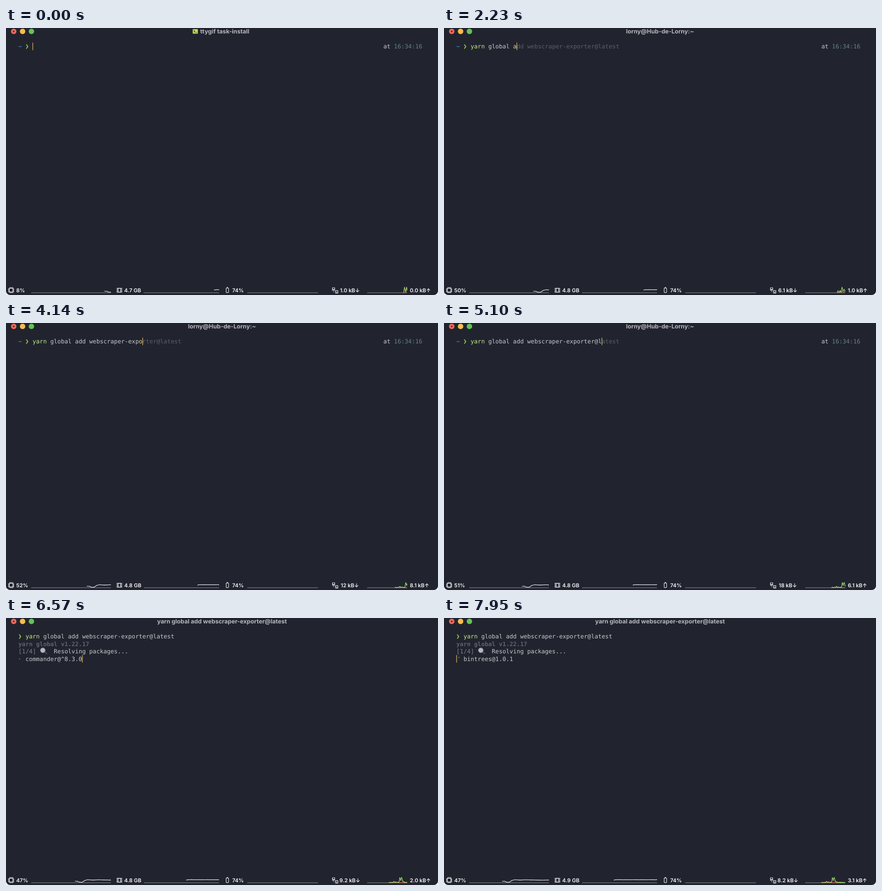
Write an HTML page that moves like this. It is 951 px wide and 589 px high and loops after 8000 ms.

```html
<!DOCTYPE html>
<html lang="en">
<head>
<meta charset="utf-8">
<title>Terminal</title>
<style>
  html, body { margin: 0; width: 100%; height: 100%; overflow: hidden; background: #fff; }
  svg { display: block; width: 951px; height: 589px; }
  text { white-space: pre; text-rendering: geometricPrecision; }
  .mono { font: 12.96px "DejaVu Sans Mono", monospace; fill: #c6c8ca; }
  .title { font: 700 13px Inter, sans-serif; fill: #b5b6ba; }
  .stat { font: 600 11.7px Inter, sans-serif; fill: #f4f4f5; }
  .blue { fill: #4aa5df; }
  .clock { fill: #648188; }
  .good { fill: #c3e88d; }
  .bad { fill: #f0616d; }
  .hint { fill: #5b5f68; }
  .dim { fill: #7b7f87; }
  .ver { fill: #5c626d; font-weight: 700; }
  .icon { fill: none; stroke: #ececee; stroke-width: 1.2; }
  .base { fill: none; stroke: #94969b; stroke-width: 1; }
  .plot { fill: none; stroke: #f4f4f5; stroke-width: 1.2; stroke-linejoin: round; }
  #rx { stroke: #a5e878; }
  #tx { stroke: #e0604f; }
</style>
</head>
<body>
<svg viewBox="0 0 951 589">
  <path fill="#21242e" d="M0 0H951V580a9 9 0 0 1-9 9H9a9 9 0 0 1-9-9Z"/>

  <circle cx="17" cy="7.5" r="6" fill="#ed6a5e"/>
  <circle cx="17" cy="7.5" r="1.9" fill="#8a1e14"/>
  <circle cx="36.5" cy="7.5" r="6" fill="#f5bd4f"/>
  <circle cx="56" cy="7.5" r="6" fill="#61c454"/>
  <g id="badge">
    <rect x="411" y="2.5" width="11.3" height="10" rx="1" fill="#ccd750"/>
    <path d="M413.3 5l2.4 2.2-2.4 2.2M416.8 9.8h3.2" fill="none" stroke="#21242e" stroke-width="1.1"/>
  </g>
  <text id="title" class="title" y="12"></text>

  <g id="prompt" class="mono">
    <text x="27.3" y="45" class="blue">~</text>
    <text x="830.7" y="45">at <tspan class="clock">16:34:16</tspan></text>
  </g>
  <path id="chevron" fill="#8fd14c" d="M1 36.3h2.1L6.4 41 3.1 45.8H1L4 41Z"/>
  <text id="line" class="mono" y="45"><tspan id="cmd"></tspan><tspan id="args"></tspan><tspan id="hint" class="hint"></tspan></text>

  <text id="version" class="mono ver" x="27.3" y="61.5">yarn global v1.22.17</text>
  <g id="resolving">
    <text class="mono dim" x="27.3" y="78">[1/4]</text>
    <path d="M85 75l4.6 3.6" stroke="#50545c" stroke-width="2.2" stroke-linecap="round"/>
    <circle cx="81" cy="71.2" r="5.3" fill="#b4bac0" stroke="#8a8f96" stroke-width="1"/>
    <text class="mono" x="105.3" y="78">Resolving packages...</text>
  </g>
  <text id="pkg" class="mono" x="42.9" y="94.5"></text>
  <circle id="dot" r=".9" fill="#b4b6ba"/>
  <rect id="cursor" width="1.3" height="16.6" fill="#e6b45c"/>

  <g class="icon">
    <rect x="7.2" y="574.2" width="8.2" height="8.2" stroke-width="1.5"/>
    <path d="M8 572.4h8M8 584.2h8M5.5 575h8M17.2 575h8" stroke-dasharray="1 1.1" transform="translate(-.5)" style="display:none"/>
    <path d="M8 572.5h7.5M8 584.1h7.5M5.6 575v7.5M17 575v7.5" stroke-dasharray="1.2 .9" stroke-width="1.5"/>
    <path d="M247 574.3h5.3v8.4H247Z"/>
    <path d="M244.8 574v9M254.5 574v9" stroke-width="2" stroke-dasharray="1.6 .8"/>
    <path d="M243.6 574.2h12M243.6 582.8h12" stroke-width="1"/>
    <rect x="484.6" y="573.6" width="5.4" height="10" rx="1"/>
    <path d="M486 572.2h2.6"/>
    <path d="M718.6 573h5v3.6h-5ZM725.6 579.4h5v3.6h-5ZM717.8 578.4h6.6M724.8 584.8h6.6"/>
    <path d="M720.6 579v3h4" stroke="#8f9198" stroke-width="1"/>
  </g>
  <path id="base" class="base"/>
  <g class="stat">
    <text id="cpu" x="22.5" y="583"></text>
    <text id="mem" x="260.3" y="583"></text>
    <text x="498" y="583">74%</text>
    <text id="down" x="757" y="583" text-anchor="middle"></text>
    <text id="up" x="889" y="583"></text>
  </g>
  <path id="cpuPlot" class="plot"/>
  <path id="memPlot" class="plot"/>
  <path id="tx" class="plot"/>
  <path id="rx" class="plot"/>
</svg>

<script>
const LOOP = 8000, CELL = 7.802, LEFT = 27.3;
const COMMAND = 'yarn global add webscraper-exporter@latest';
const $ = id => document.getElementById(id);
const col = c => LEFT + c * CELL;
const show = (id, on) => $(id).style.display = on ? '' : 'none';

// Bursts of screen updates: first time, last time, count.
const bursts = [
  [270, 570, 4], [790, 1170, 6], [1330, 1740, 6], [1910, 1910, 1], [2130, 2230, 2],
  [2540, 2540, 1], [2710, 2790, 2], [3010, 3340, 5], [3410, 3410, 1], [3560, 4280, 11],
  [4410, 4470, 2], [4800, 4800, 1], [5100, 5480, 6], [5660, 6010, 6], [6090, 6450, 6],
  [6510, 7290, 14], [7350, 7950, 11]
];
const ticks = bursts.flatMap(([a, b, n]) =>
  Array.from({ length: n }, (_, i) => a + (n > 1 ? (b - a) * i / (n - 1) : 0)));
const LAST = ticks.length, ENTER = 49, SPIN = 55;

// step, CPU %, memory, kB down, kB up
const stats = [
  [0, 8, '4.7', '1.0', '0.0'], [3, 24, '4.7', '5.1', '3.1'], [8, 42, '4.8', '8.2', '2.0'],
  [13, 52, '4.8', '4.1', '1.0'], [18, 50, '4.8', '6.1', '1.0'], [21, 48, '4.8', '5.1', '1.0'],
  [25, 47, '4.9', '33', '6.1'], [31, 50, '4.8', '21', '4.1'], [36, 52, '4.8', '12', '8.1'],
  [40, 51, '4.8', '18', '6.1'], [46, 49, '4.8', '6.2', '3.0'], [52, 48, '4.8', '4.1', '0.0'],
  [58, 47, '4.8', '9.2', '2.0'], [64, 46, '4.9', '3.1', '1.0'], [70, 45, '4.9', '4.2', '0.0'],
  [76, 46, '4.9', '5.1', '1.0'], [82, 47, '4.9', '8.2', '3.1']
];
const cpuKeys = [[-14, 30], [-11, 24], [-9, 28], [-5, 11], [1, 8], [7, 42],
  ...stats.slice(3).map(s => [s[0], s[1]])];
const rxKeys = [[-15, 0], [-11, 3], [-7, .5], [-2, 3], [1, .6], [3, 3], [6, 8], [10, 2.5],
  [15, 5], [19, 2], [28, 3], [31, 31], [35, 14], [39, 33], [43, 9], [48, 5], [52, 2], [60, 1.5]];
const txKeys = [[-8, 0], [-4, .4], [-1, 2.2], [3, .4], [8, 2.4], [12, .4], [16, 2], [20, .6]];

const packages = [
  [SPIN, 'webscraper-exporter@latest'], [61, 'commander@^8.3.0'], [64, 'express@^4.17.1'],
  [67, 'puppeteer@^13.0.0'], [70, '@types/node@*'], [74, 'prom-client@^14.0.1'],
  [78, 'tdigest@^0.1.1'], [81, 'bintrees@1.0.1']
];

const latest = (rows, n) => rows.filter(r => r[0] <= n).pop();
const wobble = i => Math.sin(i * 1.7) * Math.sin(i * .63 + 1);

function lerp(keys, i) {
  const k = keys.findIndex(p => p[0] >= i);
  if (k < 0) return keys[keys.length - 1][1];
  if (k === 0) return keys[0][1];
  const [a, u] = keys[k - 1], [b, v] = keys[k];
  return u + (v - u) * (i - a) / (b - a);
}

// Newest sample sits at the right edge; older ones move left by dx.
function plot(id, right, dx, from, n, height) {
  let d = '';
  for (let i = from; i <= n; i++) {
    d += (d ? 'L' : 'M') + (right - dx * (n - i)).toFixed(2) + ' ' + (584 - height(i)).toFixed(2);
  }
  $(id).setAttribute('d', d);
}

function typed(n) {
  if (n < 5) return 0;
  if (n < 7) return 1;
  return n < 19 ? n - 5 : n - 6;
}

function drawTitle(n) {
  const t = $('title');
  show('badge', n < 1);
  t.setAttribute('x', n < 1 ? 427.5 : 475.5);
  t.setAttribute('text-anchor', n < 1 ? 'start' : 'middle');
  t.textContent = n < 1 ? 'ttygif task-install' : n < 48 ? 'lorny@Hub-de-Lorny:~' : COMMAND;
}

function drawShell(n) {
  const run = n >= ENTER, len = Math.min(typed(n), COMMAND.length);
  const start = run ? 2 : 4;
  show('prompt', !run);
  $('chevron').setAttribute('transform', `translate(${col(start - 2) - .2})`);
  $('line').setAttribute('x', col(start));
  $('cmd').textContent = COMMAND.slice(0, Math.min(4, len));
  $('cmd').setAttribute('class', len < 4 ? 'bad' : 'good');
  $('args').textContent = COMMAND.slice(4, Math.max(4, len));
  $('hint').textContent = n > 5 ? COMMAND.slice(len) : '';

  show('version', n >= 52);
  show('resolving', n >= 53);
  const spin = n >= SPIN, name = spin ? latest(packages, n)[1] : '';
  $('pkg').textContent = name;
  show('dot', spin);
  // The braille dot runs down the left column and up the right one.
  const phase = (Math.min(n, LAST - 1) + 3) % 8, row = phase < 4 ? phase : 7 - phase;
  $('dot').setAttribute('cx', phase < 4 ? 30 : 33.2);
  $('dot').setAttribute('cy', 87 + row * 3.2);

  let c = start + len, r = 0;
  if (run) {
    r = n < 52 ? 1 : n < 53 ? 2 : 3;
    c = spin && n < LAST ? 2 + name.length : 0;
  }
  $('cursor').setAttribute('x', col(c) - .2);
  $('cursor').setAttribute('y', 32.3 + r * 16.5);
}

function drawStatus(n) {
  const [, cpu, mem, down, up] = latest(stats, n);
  $('cpu').textContent = cpu + '%';
  $('mem').textContent = mem + ' GB';
  $('down').textContent = down + ' kB↓';
  $('up').textContent = up + ' kB↑';
  $('base').setAttribute('d', `M55.5 584H231M${mem === '4.7' ? 303 : 304} 584H469M531 584H687M795 584H883`);

  plot('cpuPlot', 231, 1.04, -14, n, i => lerp(cpuKeys, i) * .126 + (i > 7 ? wobble(i) * .2 : 0));
  plot('memPlot', 469, .99, -11, n, i => i < -9 ? 5.8 : 6.6 + .2 * wobble(i));
  const scale = 12.5 / (n < 3 ? 3 : n < 22 ? 8 : 33);
  const net = (keys, size) => i =>
    Math.max(0, Math.min(12.8, scale * (lerp(keys, i) + (i > 19 ? size * wobble(i * 1.3) : 0))));
  plot('tx', 883, .52, -15, n, net(txKeys, .8));
  plot('rx', 883, .52, -15, n, net(rxKeys, 2.2));
}

let shown = -1;
const begin = performance.now();
function frame() {
  const t = (performance.now() - begin) % LOOP;
  const n = ticks.filter(x => x <= t + .5).length;
  if (n !== shown) {
    shown = n;
    drawTitle(n);
    drawShell(n);
    drawStatus(n);
  }
  requestAnimationFrame(frame);
}
frame();
</script>
</body>
</html>
```
